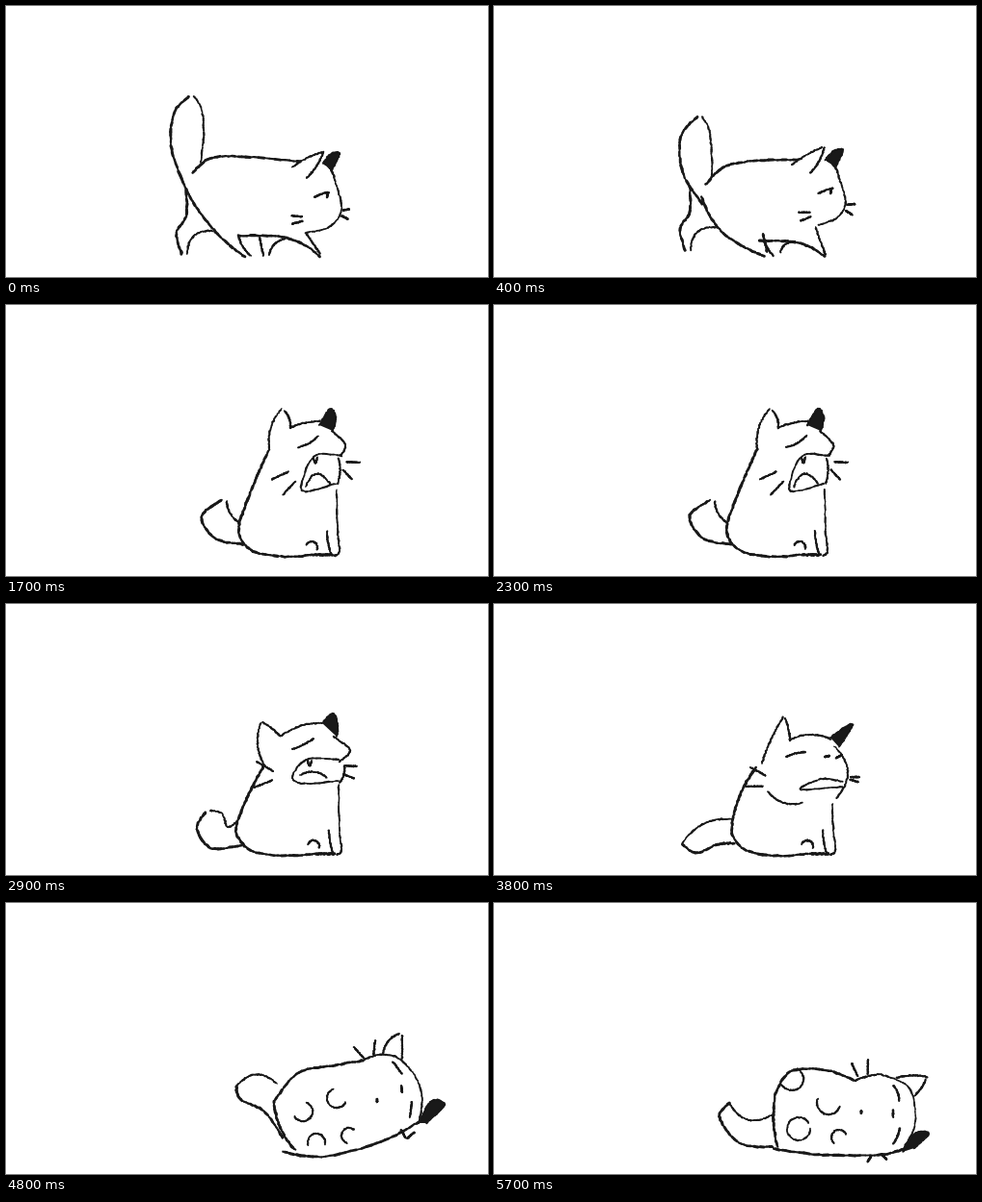
Write an HTML page with a canvas that moves like this. It is 500x282 px and loops after 5800 ms.

```html
<!DOCTYPE html>
<html lang="en">
<head>
<meta charset="utf-8">
<title>Sleepy cat</title>
<style>
html, body { margin: 0; width: 100%; height: 100%; overflow: hidden; background: #fff; }
canvas { display: block; }
</style>
</head>
<body>
<canvas id="stage" width="500" height="282"></canvas>
<script>
const ctx = document.getElementById('stage').getContext('2d');
const LOOP = 5800, STEP = 100, GROUND = 262, SAMPLES = 36, INK = '#191919';
const HEAVY = ['back', 'rump', 'floor', 'tail2', 'hind1'];

const lerp = (a, b, u) => a + (b - a) * u;
const noise = n => { const s = Math.sin(n * 127.1 + 3.7) * 43758.5453; return s - Math.floor(s); };
const trace = f => Array.from({ length: SAMPLES }, (_, i) => f(i / (SAMPLES - 1)));
const rad = deg => deg * Math.PI / 180;

// Smooth curve through a few key points.
function curve(...v) {
  const n = v.length / 2;
  const at = (i, k) => v[2 * Math.max(0, Math.min(n - 1, i)) + k];
  return trace(s => {
    const p = s * (n - 1), i = Math.min(n - 2, Math.floor(p)), u = p - i;
    return [0, 1].map(k => {
      const a = at(i - 1, k), b = at(i, k), c = at(i + 1, k), d = at(i + 2, k);
      return b + .5 * u * (c - a + u * (2 * a - 5 * b + 4 * c - d + u * (3 * (b - c) + d - a)));
    });
  });
}

// Line that bulges by sag to the left of its direction.
function bow(x1, y1, x2, y2, sag = 0) {
  const dx = x2 - x1, dy = y2 - y1, len = Math.hypot(dx, dy);
  return trace(u => {
    const h = 4 * u * (1 - u) * sag / len;
    return [x1 + dx * u + dy * h, y1 + dy * u - dx * h];
  });
}

const ring = (x, y, r, from, sweep) => trace(u => {
  const a = rad(from + sweep * u);
  return [x + r * Math.cos(a), y + r * Math.sin(a)];
});

// A pair of whiskers side by side, opening by spread degrees.
function fan(name, x, y, len, gap, tilt, spread) {
  const hair = side => {
    const cx = x - side * gap / 2 * Math.sin(rad(tilt)), cy = y + side * gap / 2 * Math.cos(rad(tilt));
    const a = rad(tilt + side * spread), dx = len / 2 * Math.cos(a), dy = len / 2 * Math.sin(a);
    return bow(cx - dx, cy - dy, cx + dx, cy + dy);
  };
  return { [name + 1]: hair(-1), [name + 2]: hair(1) };
}

// Bottom and front legs of the sitting cat.
const seated = (x, y, front, neck) => ({
  rump: curve(x, y, x + 1, 242, x + 16, 257, x + 48, 262, front - 27, 260),
  leg: bow(front - 12, 235, front - 8, 259, -1),
  paw: ring(front - 28, 252, 6, 200, 180),
  floor: bow(front - 26, 260, front - 6, 260),
  chest: curve(front - 2, neck, front - 1, 235, front + 1, 256, front - 4, 261)
});

const walk = {
  tail1: curve(202, 163, 205, 135, 203, 108, 195, 94),
  tail2: curve(190, 94, 174, 112, 172, 150, 187, 191),
  back: curve(193, 174, 213, 158, 250, 157, 305, 162),
  rump: bow(187, 191, 248, 261, -6),
  hind1: curve(187, 191, 187, 218, 177, 236, 182, 258),
  hind2: bow(188, 258, 214, 234, 9),
  floor: curve(241, 239, 285, 240, 310, 249, 326, 261),
  leg: bow(241, 239, 254, 260, -2),
  leg2: bow(263, 241, 267, 260),
  paw: bow(273, 259, 290, 242, 4),
  chest: bow(311, 236, 326, 258),
  head: bow(331, 164, 341, 181, 2),
  face: curve(341, 181, 348, 212, 335, 230, 311, 236),
  earL1: bow(297, 168, 329, 152, 2),
  earL2: bow(329, 152, 312, 179, 2),
  earR: curve(329, 164, 337, 154, 346, 154, 338, 171),
  eye: bow(320, 199, 335, 194, 1),
  nose: bow(334, 194, 333, 199),
  ...fan('left', 302, 222, 11, 6.5, -5, -10),
  ...fan('right', 352, 216, 7, 8, 10, 18)
};
const sit = {
  ...seated(247, 219, 350, 212),
  tail1: curve(247, 219, 236, 211, 232, 189, 227, 177),
  tail2: curve(222, 176, 202, 203, 215, 241, 250, 249),
  back: bow(247, 219, 300, 153, 4),
  head: bow(333, 148, 357, 174, 7),
  face: bow(357, 174, 360, 205, 6),
  earL1: bow(296, 156, 324, 133, -1),
  earL2: bow(332, 133, 325, 159, 3),
  earR: curve(336, 150, 348, 142, 359, 139, 353, 158),
  eye: bow(333, 184, 350, 177, -1),
  ...fan('left', 333, 207, 15, 8, -25, -15),
  ...fan('right', 370, 196, 9, 12, 20, 20)
};
const yawn = {
  ...seated(242, 226, 345, 192),
  tail1: bow(241, 226, 229, 204, 3),
  tail2: curve(224, 203, 203, 220, 217, 243, 246, 249),
  back: bow(242, 226, 273, 150, 1),
  head: bow(295, 128, 326, 121, 2),
  face: curve(338, 131, 352, 145, 347, 157),
  earL1: bow(273, 150, 286, 108, 5),
  earL2: bow(289, 110, 295, 128, 2),
  earR: curve(325, 125, 336, 108, 342, 117, 339, 131),
  mouth: curve(348, 157, 320, 157, 307, 185, 311, 194, 342, 186),
  tongue: bow(311, 189, 336, 186, 12),
  tooth: bow(319, 158, 323, 158, -6),
  jaw: bow(345, 160, 344, 186, 2),
  eye: bow(303, 148, 324, 136, -2),
  ...fan('left', 289, 184, 19, 16, -36, -11),
  ...fan('right', 357, 170, 14, 14, 24, 22)
};
const grumble = {
  ...seated(239, 230, 347, 188),
  tail1: curve(240, 226, 230, 232, 224, 218, 212, 215),
  tail2: curve(207, 217, 198, 234, 213, 254, 244, 251),
  back: bow(239, 230, 268, 168, 2),
  head: bow(286, 137, 328, 124, 4),
  face: curve(340, 138, 357, 152, 346, 164),
  earL1: bow(268, 168, 264, 124, 5),
  earL2: bow(266, 123, 285, 138, 1),
  earR: curve(328, 124, 339, 114, 344, 125, 343, 138),
  mouth: curve(345, 162, 312, 162, 297, 180, 310, 187, 345, 184),
  tongue: bow(305, 178, 333, 181, 5),
  tooth: bow(313, 163, 317, 163, -5),
  jaw: bow(351, 168, 346, 186, 2),
  eye: bow(297, 151, 319, 140, -1),
  ...fan('left', 268, 178, 20, 18, 4, -26),
  ...fan('right', 357, 174, 12, 11, 12, 9)
};
const doze = {
  ...seated(247, 228, 353, 208),
  tail1: bow(247, 224, 195, 250, -9),
  tail2: curve(195, 250, 210, 259, 232, 250, 249, 249),
  back: bow(247, 228, 272, 170, 4),
  head: bow(307, 141, 350, 141, 5),
  face: bow(353, 148, 355, 202, 13),
  earL1: bow(278, 166, 300, 118, 2),
  earL2: bow(302, 119, 307, 142, 1),
  earR: curve(349, 139, 361, 130, 372, 126, 358, 149),
  mouth: curve(362, 185, 340, 182, 318, 193, 361, 190),
  jaw: bow(284, 195, 320, 207, -6),
  eye: bow(303, 159, 323, 154, 1),
  nose: bow(343, 159, 348, 158),
  brow: bow(355, 160, 361, 157),
  ...fan('left', 272, 182, 18, 16, 14, -14),
  ...fan('right', 374, 182, 9, 4, 9, 9)
};
const flop = {
  tail1: bow(281, 188, 239, 191, -11),
  tail2: curve(239, 191, 243, 204, 268, 217, 287, 244),
  back: curve(278, 206, 303, 177, 340, 169, 370, 164),
  rump: bow(278, 206, 300, 257, -5),
  floor: curve(287, 259, 330, 264, 390, 248, 428, 228),
  head: bow(370, 164, 405, 160, 4),
  face: bow(405, 160, 428, 228, 13),
  earL1: bow(391, 157, 408, 136, 4),
  earL2: bow(411, 138, 411, 162),
  earR: curve(428, 229, 441, 206, 455, 210, 436, 229),
  eye: bow(401, 165, 411, 178),
  nose: bow(410, 190, 411, 197),
  brow: bow(421, 207, 419, 223),
  dot: bow(385, 204, 385, 207),
  leg: ring(343, 203, 10, 25, 225),
  leg2: ring(308, 217, 10, 150, -220),
  paw: ring(322, 249, 9, 160, 215),
  paw2: ring(356, 242, 8, -50, -205),
  ...fan('left', 374, 153, 15, 17, 72, -24),
  ...fan('right', 416, 241, 10, 8, 100, -40)
};
const sleep = {
  tail1: bow(289, 220, 244, 208, 12),
  tail2: curve(244, 208, 234, 223, 255, 250, 290, 254),
  back: curve(292, 198, 308, 175, 345, 174, 374, 185),
  rump: bow(292, 198, 294, 254, -3),
  floor: curve(290, 256, 340, 262, 400, 262, 425, 256),
  head: bow(374, 185, 400, 178, 1),
  face: curve(400, 178, 430, 192, 437, 228, 424, 257),
  earL1: bow(417, 182, 449, 181, 2),
  earL2: bow(448, 184, 436, 201, 1),
  earR: curve(424, 259, 436, 240, 451, 240, 436, 255),
  eye: bow(414, 190, 420, 206, 2),
  nose: bow(414, 215, 414, 223),
  brow: bow(421, 234, 414, 251, 1),
  dot: bow(381, 216, 381, 219),
  leg: ring(347, 208, 12, 20, 180),
  leg2: ring(309, 183, 12, 150, -210),
  paw: ring(316, 235, 12, 0, 330),
  paw2: ring(358, 244, 8, 127, 208),
  ...fan('left', 381, 172, 15, 14, 78, -13),
  ...fan('right', 397, 265, 8, 15, 82, 38)
};

// time, pose, shift, lean
const KEYS = [
  [0, walk], [300, walk, 14], [600, sit, 9], [900, sit], [1600, yawn], [2400, yawn],
  [2900, grumble], [3200, grumble], [3800, doze], [4400, doze, 0, .18],
  [4800, flop], [5100, flop], [5400, sleep], [LOOP, sleep]
];
const PARTS = [...new Set(KEYS.flatMap(key => Object.keys(key[1])))];

// Leaning pushes high points forward and stretches the body.
function shape([, pose, shift = 0, lean = 0], part) {
  return pose[part] && pose[part].map(([x, y]) => {
    const h = GROUND - y;
    return [x + shift + lean * h * h / 140, y - h * lean / 2];
  });
}

function blend(from, to, part, u) {
  const a = shape(from, part), b = shape(to, part);
  if (a && b) return a.map((p, i) => [lerp(p[0], b[i][0], u), lerp(p[1], b[i][1], u)]);
  const own = u < .5 ? a : b;
  if (!own) return null;
  // Unpaired strokes travel with the eye.
  const eye = blend(from, to, 'eye', u)[0], home = shape(u < .5 ? from : to, 'eye')[0];
  return own.map(([x, y]) => [x + eye[0] - home[0], y + eye[1] - home[1]]);
}

function ink(points, width, seed) {
  const rough = points.map(([x, y], i) => [
    x + (noise(seed + i) - .5) * .8, y + (noise(seed + i + .5) - .5) * .8
  ]);
  for (let i = 1; i < rough.length; i++) {
    ctx.lineWidth = width * (.7 + .6 * noise(seed - i));
    ctx.beginPath();
    ctx.moveTo(...rough[i - 1]);
    ctx.lineTo(...rough[i]);
    ctx.stroke();
  }
}

function draw(t) {
  const k = KEYS.findIndex((key, i) => t < KEYS[i + 1][0]);
  const from = KEYS[k], to = KEYS[k + 1];
  const v = (t - from[0]) / (to[0] - from[0]), u = v * v * (3 - 2 * v);
  const swing = t < 600 ? Math.sin(Math.PI * t / 200) * .3 : 0;
  ctx.fillStyle = '#fff';
  ctx.fillRect(0, 0, 500, 282);
  ctx.fillStyle = ctx.strokeStyle = INK;
  ctx.lineCap = ctx.lineJoin = 'round';
  PARTS.forEach((part, n) => {
    let points = blend(from, to, part, u);
    if (!points) return;
    const side = n % 2 ? swing : -swing;
    points = points.map(([x, y]) => [x + side * Math.max(0, y - 238), y]);
    if (part === 'earR') {
      ctx.beginPath();
      points.forEach(p => ctx.lineTo(...p));
      ctx.fill();
    }
    ink(points, HEAVY.includes(part) ? 2.5 : 1.8, n * 50 + t / STEP);
  });
}

const start = performance.now();
function tick() {
  const t = (performance.now() - start) % LOOP;
  draw(Math.floor(t / STEP) * STEP);
  requestAnimationFrame(tick);
}
tick();
</script>
</body>
</html>
```
